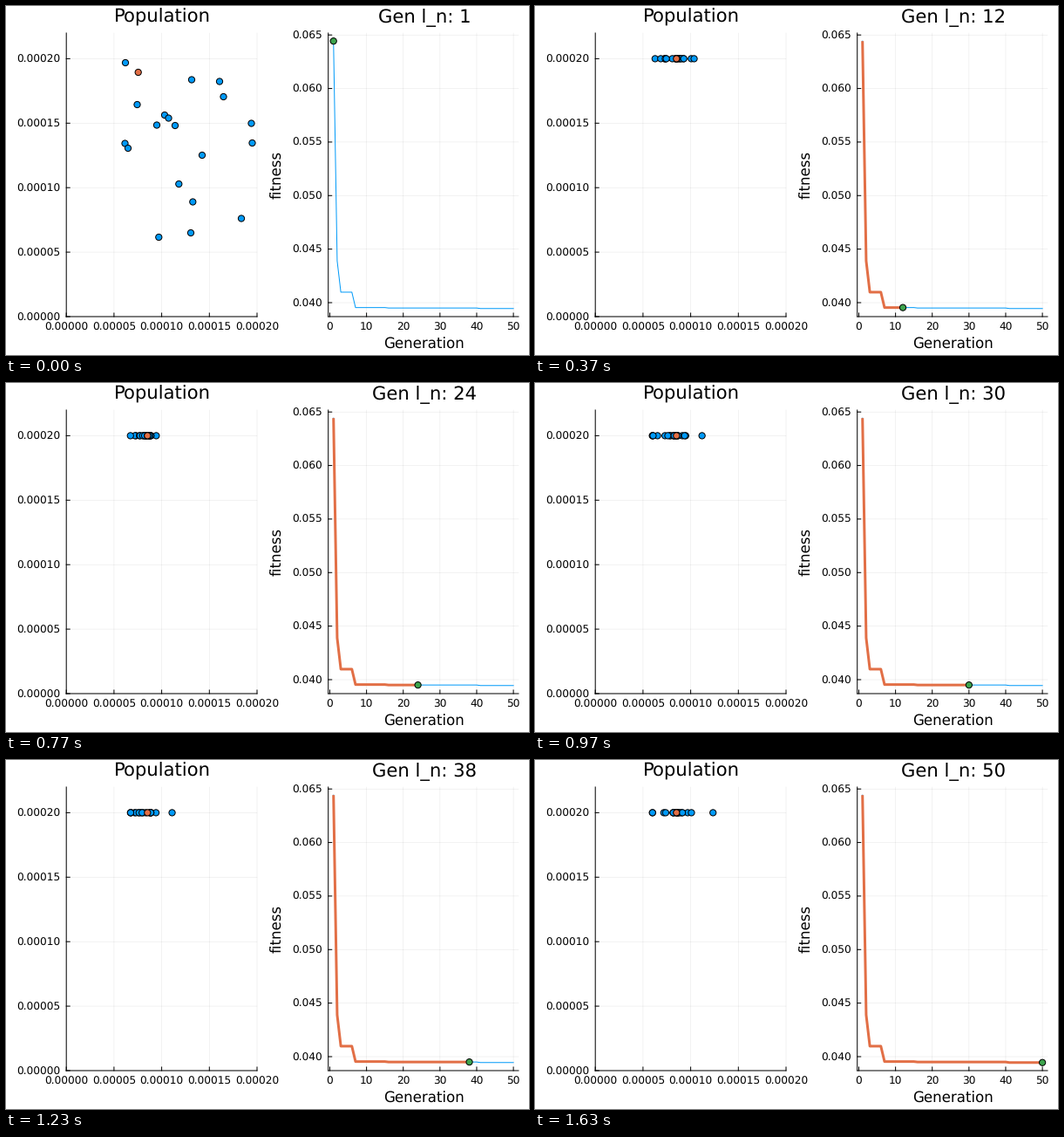
These frames come from a looping animation (600 by 400 pixels, 1.66 s). A matplotlib script:

```python
import numpy as np
import matplotlib.pyplot as plt
from matplotlib.animation import FuncAnimation

W, H, DPI = 600, 400, 100
PT = 72 / DPI
BLUE, ORANGE, GREEN = "#009af9", "#e26f46", "#3da44d"
TOP, BOTTOM = 31, 356
CEIL, MIN_X = 60.4, 134.8    # pixel limits of the search box
GENS = 50

plt.rcParams["font.family"] = "DejaVu Sans"
plt.rcParams["text.hinting"] = "none"
fig = plt.figure(figsize=(W / DPI, H / DPI), dpi=DPI, facecolor="white")
ax = fig.add_axes([0, 0, 1, 1])
ax.set_xlim(0, W)
ax.set_ylim(H, 0)
ax.axis("off")


def line(x, y, color="black", width=1.0, **kw):
    return ax.plot(x, y, color=color, lw=width * PT, snap=False, **kw)[0]


def dot(color, z):
    return ax.add_patch(plt.Circle((0, 0), 3.6, fc=color, ec="black",
                                   lw=PT, zorder=z))


def label(x, y, text, size, ha="center", **kw):
    return ax.text(x, y, text, fontsize=size * PT, ha=ha, va="baseline", **kw)


def panel(left, right, xticks, yticks):
    """Axis lines, inward ticks, grid and tick labels; ticks are (pixel, text)."""
    for x, text in xticks:
        line([x, x], [TOP, BOTTOM], alpha=0.1, width=0.5, zorder=1)
        line([x, x], [BOTTOM, BOTTOM - 4], zorder=2)
        label(x, 371.8, text, 12.1)
    for y, text in yticks:
        line([left, right], [y, y], alpha=0.1, width=0.5, zorder=1)
        line([left, left + 4], [y, y], zorder=2)
        label(left - 7.2, y + 4.4, text, 12.1, ha="right")
    line([left, left], [TOP, BOTTOM], zorder=2)
    line([left, right], [BOTTOM, BOTTOM], zorder=2)


def gen_x(gen):
    return 371.5 + 4.212 * np.asarray(gen)


def fit_y(fit):
    return 33.2 + (0.065 - np.asarray(fit)) * 12272


panel(69.2, 288,
      [(69.2 + 54.7 * k, f"{k * 5e-5:.5f}") for k in range(5)],
      [(BOTTOM - 73.9 * k, f"{k * 5e-5:.5f}") for k in range(5)])
panel(369.7, 588,
      [(gen_x(g), str(g)) for g in range(0, 51, 10)],
      [(fit_y(f), f"{f:.3f}") for f in np.arange(0.040, 0.0651, 0.005)])

label(179, 19, "Population", 21.1)
title = label(479.8, 19, "", 21.1)
label(479.5, 392.5, "Generation", 16.6)
label(316.5, 193, "fitness", 16.6, rotation=90, rotation_mode="anchor")

# Best fitness drops in a few steps
gens = np.arange(1, GENS + 1)
fitness = np.select(
    [gens == 1, gens == 2, gens <= 6, gens <= 15, gens <= 40],
    [0.06443, 0.0439, 0.04098, 0.03954, 0.03950], 0.03945)
curve_x, curve_y = gen_x(gens), fit_y(fitness)

# Starting population in pixels
start = np.array([
    (137, 65), (213, 84.5), (245, 86.5), (249.5, 104), (150.5, 113),
    (182, 125), (186.5, 128.5), (173, 136.5), (194, 137), (281.5, 134.5),
    (282.5, 157), (136.5, 157.5), (140, 163), (225, 171), (198.3, 204),
    (214.3, 224.5), (270, 243.5), (212, 260), (175.3, 265)])
start_best = np.array([151.7, 76])
goal = np.array([162.3, CEIL])


def population(g):
    """Shrinks towards the goal, with mutations clipped to the search box."""
    if g == 0:
        return start
    rng = np.random.default_rng(g)
    pull = np.exp(-g / 3)
    pts = goal + (start - goal) * pull
    pts[:, 0] += rng.laplace(-1, 9, len(pts))
    pts[:, 1] -= rng.uniform(4, 12, len(pts))
    return np.maximum(pts, (MIN_X, CEIL))


def best(g):
    return goal + (start_best - goal) * np.exp(-g / 1.5)


line(curve_x, curve_y, BLUE, 1.0, zorder=3)
trail = line([], [], ORANGE, 3.0, zorder=4, solid_capstyle="butt")
marker = dot(GREEN, 5)
crowd = [dot(BLUE, 3) for _ in start]
leader = dot(ORANGE, 4)


def update(t):
    # 10 ms ticks; generations last 30, 30 and 40 ms in turn
    g = 3 * (t // 10) + min(t % 10 // 3, 2)
    title.set_text(f"Gen l_n: {g + 1}")
    trail.set_data(curve_x[:g + 1], curve_y[:g + 1])
    marker.center = curve_x[g], curve_y[g]
    for member, spot in zip(crowd, population(g)):
        member.center = spot
    leader.center = best(g)
    return title, trail, marker, leader, *crowd


anim = FuncAnimation(fig, update, frames=166, interval=10, repeat=True,
                     repeat_delay=0, init_func=lambda: update(0))
plt.show()
```
